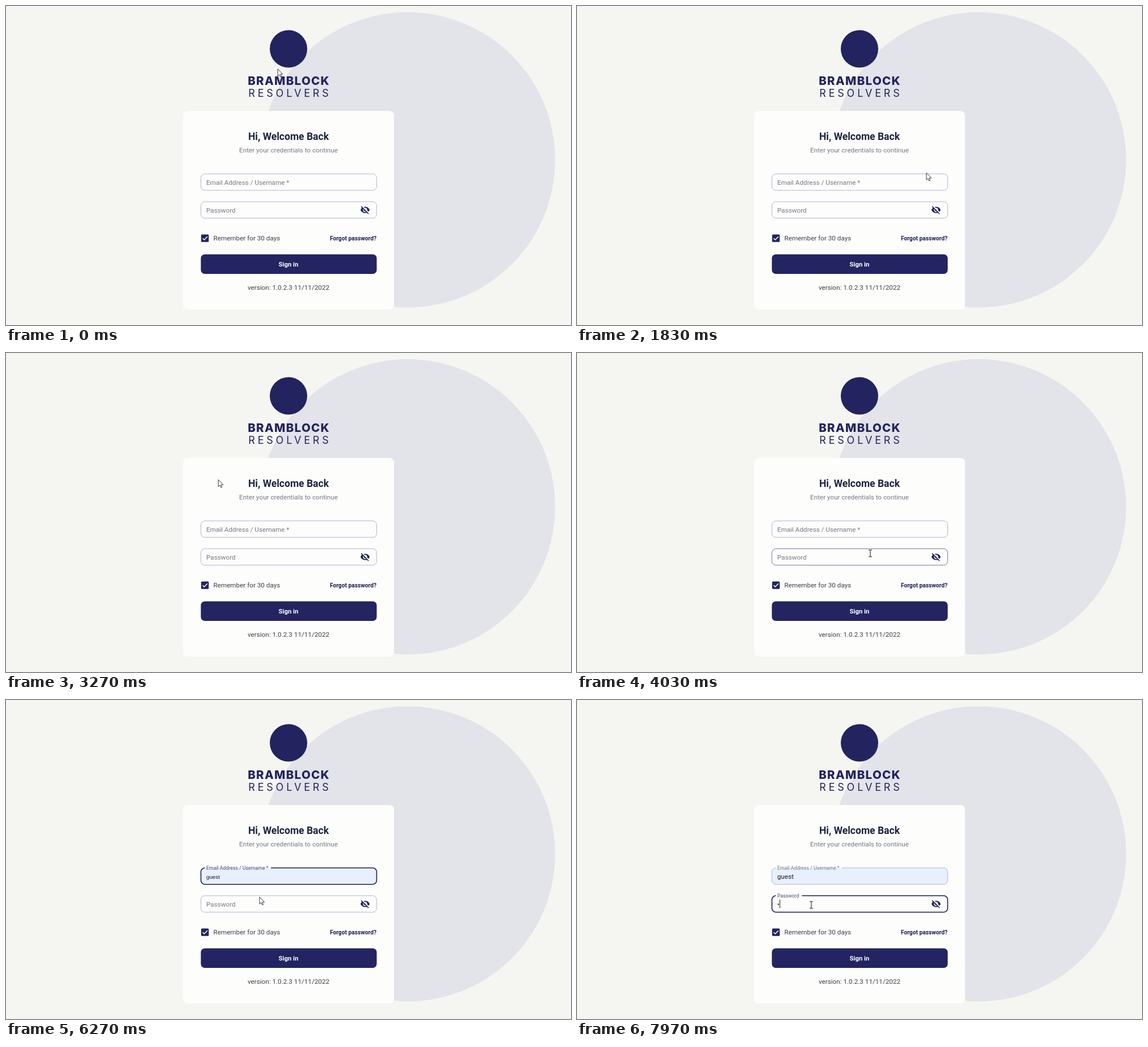
An HTML page for the animation above (8 s loop, 996 px wide and 562 px high).

```html
<!DOCTYPE html>
<html lang="en">
<head>
<meta charset="utf-8">
<title>Sign in</title>
<style>
  html, body { margin: 0; width: 100%; height: 100%; overflow: hidden; background: #f5f5f2; }
  svg { display: block; width: 996px; height: 562px; }
  text { font: 11.69px Roboto, sans-serif; fill: #3a3e48; }
  .middle { text-anchor: middle; }
  .brand { font-family: Inter, sans-serif; fill: #23235f; }
  .label { fill: #757983; }
  .focused .label { fill: #4a4b78; }
  .outline { fill: none; stroke: #b3b2d0; stroke-width: 1; }
  .hovered .outline { stroke: #74749c; }
  .focused .outline { stroke: #1e1e52; stroke-width: 1.6; }
  .value { fill: #16181d; }
  .preview { font: 9.75px "Liberation Sans", Arial, sans-serif; }
  .caret { stroke: #16181d; stroke-width: 1; }
</style>
</head>
<body>
<svg viewBox="0 0 996 562">
  <rect width="996" height="562" fill="#f5f5f2"/>
  <circle cx="708" cy="271" r="260" fill="#e3e3ea"/>

  <circle cx="498" cy="75.5" r="33" fill="#23235f"/>
  <text class="middle brand" x="498.6" y="139" style="font-size:20.5px;font-weight:800;letter-spacing:1.3px">BRAMBLOCK</text>
  <text class="middle brand" x="500.4" y="160" style="font-size:18px;letter-spacing:4.8px">RESOLVERS</text>

  <rect x="312.5" y="185" width="371.5" height="350" rx="8" fill="#fdfdfc"/>
  <text class="middle" x="498" y="236" style="font-size:17.54px;font-weight:700;fill:#1c2540">Hi, Welcome Back</text>
  <text class="middle" x="498" y="258" style="fill:#757983">Enter your credentials to continue</text>

  <g id="email"></g>
  <g id="password"></g>

  <g transform="translate(624.2 350.5) scale(.731)">
    <path d="M1 12C4.7 2 19.3 2 23 12C19.3 22 4.7 22 1 12z" fill="#1f2352"/>
    <circle cx="12" cy="12" r="4" fill="none" stroke="#fdfdfc" stroke-width="2"/>
    <path d="M4 2L22 20" stroke="#fdfdfc" stroke-width="2.4"/>
    <path d="M2.6 3.6L20.4 21.4" stroke="#1f2352" stroke-width="2"/>
  </g>

  <rect x="344" y="402.4" width="13.4" height="13.4" rx="1.6" fill="#23235f"/>
  <path d="M346.6 409.2l2.8 2.8 5.6-5.8" fill="none" stroke="#fff" stroke-width="1.5"/>
  <text x="365.5" y="413.2">Remember for 30 days</text>
  <text x="653" y="413" text-anchor="end" style="font-size:10.23px;font-weight:700;fill:#1e1e56">Forgot password?</text>

  <rect x="343.5" y="437.5" width="310" height="34.5" rx="7" fill="#232461"/>
  <text class="middle" x="498" y="459" style="font-size:11.3px;font-weight:700;fill:#fff">Sign in</text>
  <text class="middle" x="498" y="500">version: 1.0.2.3 11/11/2022</text>

  <path id="arrow" d="M0 0V12.4L2.8 9.8 4.7 14 6.6 13.2 4.8 9.1H8.6Z" fill="#fff" stroke="#222" stroke-width=".9"/>
  <path id="beam" d="M-3 -6H-1L0 -5.2 1 -6H3M0 -5.2V5.2M-3 6H-1L0 5.2 1 6H3" fill="none" stroke="#222" stroke-width="1.1"/>
</svg>
<script>
const LOOP = 8000, LEFT = 343.6, RIGHT = 653.4, HEIGHT = 29;
const EMAIL_FOCUS = 4750, PREVIEW = 5850, FILLED = 6500, PASSWORD_FOCUS = 7150, TYPED = 7700;
const BLINK = 530, LABEL_TIME = 200;

// Pointer positions: time, x, y
const track = [
  [0, 479, 111], [450, 497, 160], [950, 560, 232], [1400, 606, 284], [1830, 616, 294],
  [2400, 470, 262], [2880, 204, 228], [3270, 374, 223], [4030, 517, 353], [4400, 212, 334],
  [4750, 476, 313], [5340, 492, 323], [5850, 468, 337], [6270, 447, 347], [6500, 441, 348],
  [7150, 420, 360], [7970, 413, 361], [8000, 413, 361]
];

const byId = id => document.getElementById(id);
const clamp = v => Math.max(0, Math.min(1, v));
const blinkOn = elapsed => elapsed >= 0 && Math.floor(elapsed / BLINK) % 2 === 0;

function pointerAt(t) {
  let i = 0;
  while (i < track.length - 2 && t >= track[i + 1][0]) i++;
  const a = track[i], b = track[i + 1], span = b[0] - a[0];
  const before = track[Math.max(0, i - 1)], after = track[Math.min(track.length - 1, i + 2)];
  const u = (t - a[0]) / span, u2 = u * u, u3 = u2 * u;
  const axis = k => {
    // No velocity at turning points, so the path never overshoots
    const slope = (p, q, r) => (q[k] - p[k]) * (r[k] - q[k]) <= 0 ? 0 : (r[k] - p[k]) / (r[0] - p[0]);
    return (2 * u3 - 3 * u2 + 1) * a[k] + (3 * u2 - 2 * u3) * b[k]
      + span * ((u3 - 2 * u2 + u) * slope(before, a, b) + (u3 - u2) * slope(a, b, after));
  };
  return [axis(1), axis(2)];
}

function makeField(id, label, top, notchEnd) {
  const group = byId(id);
  group.innerHTML = `
    <rect x="${LEFT}" y="${top}" width="${RIGHT - LEFT}" height="${HEIGHT}" rx="7.5"/>
    <path class="outline"/><text class="label">${label}</text>
    <text class="value" x="353"></text><path class="caret"/>`;
  const [fill, outline, labelText, value, caret] = group.children;
  const contains = ([x, y]) => x > LEFT && x < RIGHT && y > top && y < top + HEIGHT;

  function draw({ raised, focused, hovered, filled, text, preview, caretX }) {
    const p = 1 - (1 - raised) ** 3, r = 7, gap = (notchEnd - 350.5) * p;
    group.setAttribute("class", focused ? "focused" : hovered ? "hovered" : "");
    fill.setAttribute("fill", filled ? "#e8f0fd" : "#fdfdfc");
    outline.setAttribute("d", `M${350.5 + gap} ${top}H${RIGHT - r}a${r} ${r} 0 0 1 ${r} ${r}v${HEIGHT - 2 * r}
      a${r} ${r} 0 0 1 ${-r} ${r}H${LEFT + r}a${r} ${r} 0 0 1 ${-r} ${-r}v${2 * r - HEIGHT}a${r} ${r} 0 0 1 ${r} ${-r}`);
    labelText.setAttribute("transform", `translate(353 ${top + 19.3 - 16 * p}) scale(${1 - .25 * p})`);
    value.textContent = text;
    value.setAttribute("class", preview ? "value preview" : "value");
    value.setAttribute("y", top + 18.8);
    caret.setAttribute("d", caretX ? `M${caretX} ${top + 7}v15` : "");
  }
  return { contains, draw };
}

const email = makeField("email", "Email Address / Username *", 295.8, 467);
const password = makeField("password", "Password", 344.8, 396.5);

function render(t) {
  const pointer = pointerAt(t);
  const menuOpen = t >= EMAIL_FOCUS && t < FILLED;
  const overEmail = email.contains(pointer);
  const overPassword = !menuOpen && password.contains(pointer);
  const filled = t >= PREVIEW, typed = t >= TYPED;

  email.draw({
    raised: clamp((t - EMAIL_FOCUS) / LABEL_TIME),
    focused: t >= EMAIL_FOCUS && t < PASSWORD_FOCUS,
    hovered: overEmail,
    filled,
    text: filled ? "guest" : "",
    preview: t < FILLED,
    caretX: !filled && blinkOn(t - EMAIL_FOCUS) ? 353.5 : 0
  });
  password.draw({
    raised: clamp((t - PASSWORD_FOCUS) / LABEL_TIME),
    focused: t >= PASSWORD_FOCUS,
    hovered: overPassword,
    text: typed ? "•" : "",
    caretX: blinkOn(t - (typed ? TYPED : PASSWORD_FOCUS)) ? (typed ? 357.7 : 353.5) : 0
  });

  const useBeam = overEmail || overPassword;
  for (const [id, shown] of [["arrow", !useBeam], ["beam", useBeam]]) {
    byId(id).setAttribute("transform", `translate(${pointer})`);
    byId(id).style.display = shown ? "" : "none";
  }
}

const start = performance.now();
function tick() {
  render((performance.now() - start) % LOOP);
  requestAnimationFrame(tick);
}
tick();
</script>
</body>
</html>
```
